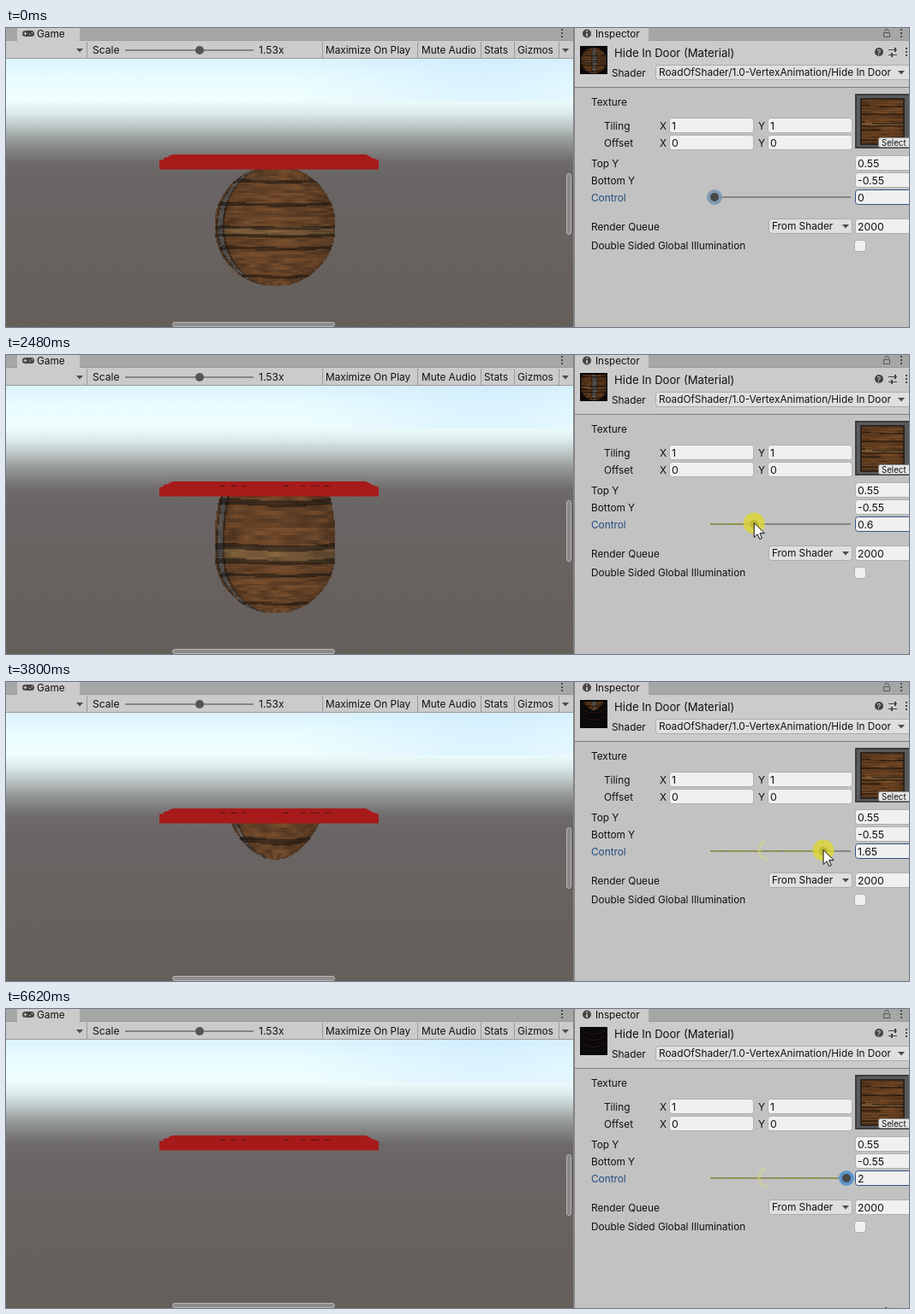
Write an HTML page with a canvas that moves like this. It is 1054x350 px and loops after 6.77 s.

```html
<!DOCTYPE html>
<html lang="en">
<head>
<meta charset="utf-8">
<title>Hide In Door</title>
<style>
  html, body { margin: 0; width: 100%; height: 100%; overflow: hidden; background: #c2c2c2; }
  canvas { display: block; }
</style>
</head>
<body>
<canvas id="stage" width="1054" height="350"></canvas>
<script>
const ctx = document.getElementById('stage').getContext('2d');
const LOOP = 6770, STEP = 78.3;
const INK = '#101010';

const CONTROL = [[16, 0], [17, 0.01], [22, 0.13], [25, 0.27], [30, 0.6], [39, 1.2], [47, 1.65], [53, 1.87], [60, 2]];
const ENTER = [[0, 1010, 335], [8, 842, 215], [11, 825, 196]];
const LEAVE = [[68, 984, 210], [73, 1010, 340]];

function sample(keys, k) {
  if (k <= keys[0][0]) return keys[0].slice(1);
  for (let i = 1; i < keys.length; i++) {
    const [a, b] = [keys[i - 1], keys[i]];
    if (k <= b[0]) {
      const f = (k - a[0]) / (b[0] - a[0]);
      return a.slice(1).map((v, j) => v + (b[j + 1] - v) * f);
    }
  }
  return keys[keys.length - 1].slice(1);
}

function box(x, y, w, h, fill, stroke, radius = 0) {
  ctx.beginPath();
  ctx.roundRect(x, y, w, h, radius);
  if (fill) { ctx.fillStyle = fill; ctx.fill(); }
  if (stroke) { ctx.strokeStyle = stroke; ctx.lineWidth = 1; ctx.stroke(); }
}

function dot(x, y, r, fill) {
  ctx.beginPath();
  ctx.arc(x, y, r, 0, 7);
  ctx.fillStyle = fill;
  ctx.fill();
}

function shape(points, fill) {
  ctx.beginPath();
  points.forEach(([x, y]) => ctx.lineTo(x, y));
  ctx.closePath();
  ctx.fillStyle = fill;
  ctx.fill();
}

function label(text, x, y, size = 11.8, color = INK) {
  ctx.font = `${size}px Inter, sans-serif`;
  ctx.fillStyle = color;
  ctx.fillText(text, x, y);
}

const arrowDown = (x, y) => shape([[x - 4, y - 2], [x + 4, y - 2], [x, y + 2.5]], '#4c4c4c');
const dots = (x, y) => [-4, 0, 4].forEach(d => box(x - 1, y + d - 1, 2, 2, '#4a4a4a'));

function field(text, x, y, w, stroke = '#b0b0b0') {
  box(x + .5, y + .5, w - 1, 17, '#f0f0f0', stroke, 3);
  label(text, x + 3, y + 14, 12.3);
}

function dropdown(text, x, y, w, arrowX) {
  box(x + .5, y + .5, w - 1, 17, '#dfdfdf', '#acacac', 3);
  label(text, x + 4, y + 13);
  arrowDown(arrowX, y + 9);
}

// Wood: horizontal planks with dark seams, one pale band and streaky grain.
const SEAMS = [.37, .18, -.015, -.08, -.185, -.42];
const hash = (a, b) => {
  const s = Math.sin(a * 127.1 + b * 311.7) * 43758.5;
  return s - Math.floor(s);
};

function grain(u, row) {
  const i = Math.floor(u), f = u - i;
  return hash(i, row) * (1 - f) + hash(i + 1, row) * f;
}

function wood(u, y, hoop, hoopWidth) {
  const noise = grain(u * 4 + 20, Math.floor(y * 55));
  const wave = .006 * Math.sin(u * 2.5 + 1);
  let light = .74 + .46 * noise;
  let rgb = y < -.015 && y > -.08 ? [130, 94, 55] : [108, 67, 34];
  if (SEAMS.some(s => Math.abs(y + wave - s) < .013)) light *= .5;
  const d = Math.abs(u - hoop);
  if (d < hoopWidth) rgb = [98, 92, 86];
  else if (d < hoopWidth + .06) light *= .5;
  light *= .72 + .28 * Math.cos(u);
  return `rgb(${rgb.map(c => c * light | 0)})`;
}

// Vertices near the door top are pulled upwards first, then the rest follows.
function ball(control, cx, cy, unit, cell, top, bottom, hoop, hoopWidth) {
  const shift = control - .525;
  for (let py = top; py < bottom; py += cell) {
    const seen = (cy - py) / unit;
    const y = seen / 1.1 + shift > 0 ? (seen - shift) / (1 + 1 / 1.1) : seen;
    if (Math.abs(y) >= .5) continue;
    const half = Math.sqrt(.25 - y * y) * unit;
    const cells = Math.floor(half / cell);
    for (let i = -cells; i <= cells; i++) {
      ctx.fillStyle = wood(Math.asin(i * cell / half), y, hoop, hoopWidth);
      ctx.fillRect(cx + i * cell - cell / 2, py, cell + .1, Math.min(cell, bottom - py) + .1);
    }
  }
}

function gameView(control) {
  const sky = ctx.createLinearGradient(0, 36, 0, 350);
  [[36, '#dcf3fd'], [58, '#e8fcff'], [84, '#effefe'], [100, '#dbe9e9'], [115, '#bcc6c6'], [130, '#9a9e9e'],
    [145, '#807f7f'], [158, '#6e6a6a'], [178, '#6a6565'], [350, '#655f5a']]
    .forEach(([y, c]) => sky.addColorStop((y - 36) / 314, c));
  box(0, 36, 662, 314, sky);
  const blue = ctx.createRadialGradient(560, 30, 0, 560, 30, 220);
  blue.addColorStop(0, 'rgba(200,230,255,.5)');
  blue.addColorStop(1, 'rgba(200,230,255,0)');
  ctx.save();
  ctx.beginPath();
  ctx.rect(0, 36, 662, 50);
  ctx.clip();
  box(0, 36, 662, 50, blue);
  ctx.restore();

  ball(control, 314, 231, 141, 1.5, 160, 301.5, -1.15, .1);
  shape([[179, 165.5], [179, 155], [184, 154], [184, 152], [190, 151], [190, 149.5], [196, 148],
    [420, 148], [424, 150], [427, 152], [433, 154], [435, 155], [435, 165.5]], '#a71a1a');
  if (control > .4) {
    [[250, 5], [262, 8], [276, 5], [323, 7], [345, 4], [356, 9], [372, 6]]
      .forEach(([x, w]) => box(x, 152.5, w, 1.5, '#6a1712'));
  }
  box(654.5, 170.5, 5, 71, '#8a8785', '#b9b7b5', 3);
  box(194.5, 344.5, 189, 5, '#8e8c8a', '#b9b7b5', 3);
}

function gameToolbar() {
  box(0, 0, 662, 15, '#a5a7a6');
  box(13, 0, 73, 15, '#cbcbcb');
  box(0, 14, 662, 22, '#cbcbcb');
  box(0, 14, 13, 1, '#999');
  box(86, 14, 576, 1, '#999');
  box(0, 35, 662, 1, '#999');
  box(19, 3, 14, 7, '#444', null, 3.5);
  box(22, 4.5, 1, 4, '#ccc'); box(20.5, 6, 4, 1, '#ccc');
  dot(28, 7.5, .8, '#ccc'); dot(30.5, 5.5, .8, '#ccc');
  label('Game', 36, 11);
  dots(649, 6);
  arrowDown(86, 26);
  [94, 369, 480, 554, 593, 645].forEach(x => box(x, 16, 1, 19, '#9b9b9b'));
  label('Scale', 101, 30, 12.1);
  box(139, 25, 150, 2, '#858585');
  dot(226, 26, 5, '#555');
  label('1.53x', 295, 30, 12.1);
  label('Maximize On Play', 373, 30);
  label('Mute Audio', 485, 30);
  label('Stats', 558, 30);
  label('Gizmos', 597, 30);
  arrowDown(653, 26);
}

function inspector(control) {
  box(662, 0, 2, 350, '#848484');
  box(664, 0, 390, 15, '#a5a7a6');
  box(664, 0, 86, 15, '#cbcbcb');
  box(664, 14, 390, 55, '#cbcbcb');
  box(750, 14, 304, 1, '#999');
  box(664, 69, 390, 281, '#c2c2c2');
  box(664, 69, 390, 1, '#7d7d7d');
  dot(678, 6.5, 5, '#444');
  box(677.3, 6, 1.5, 4, '#ddd'); box(677.3, 3, 1.5, 1.5, '#ddd');
  label('Inspector', 688, 11, 11.6);
  box(1024.5, 5.5, 7, 5, null, '#555');
  ctx.beginPath(); ctx.arc(1028, 4, 2.5, Math.PI, 0); ctx.stroke();
  dots(1045, 6);

  box(670, 21, 32, 33, '#0b0909');
  if (control > 1) {
    ctx.strokeStyle = '#2a1815';
    ctx.lineWidth = 1;
    [27, 34, 42].forEach(y => {
      ctx.beginPath(); ctx.moveTo(673, y - 2); ctx.quadraticCurveTo(686, y + 7, 699, y - 2); ctx.stroke();
    });
  }
  ball(control, 686, 37.5, 30, 1, 23, 53, .05, .17);
  label('Hide In Door (Material)', 710, 34, 13.1);
  dot(1019, 28, 5, '#444');
  label('?', 1016.5, 31.5, 9, '#eee');
  [[25, 1037], [31, 1033]].forEach(([y, x]) => { box(1030, y, 10, 1, '#444'); box(x, y - 2, 2, 5, '#444'); });
  dots(1051, 28);
  label('Shader', 707, 57);
  dropdown('RoadOfShader/1.0-VertexAnimation/Hide In Door', 758, 43, 300, 1045);

  label('Texture', 683, 91);
  [['Tiling', 105, '1'], ['Offset', 125, '0']].forEach(([name, y, value]) => {
    label(name, 698, y + 14);
    label('X', 763, y + 14); field(value, 774, y, 99);
    label('Y', 878, y + 14); field(value, 889, y, 99);
  });
  box(991, 77, 63, 64, '#3e3e40');
  box(993, 79, 61, 60, '#595b5f');
  box(997, 82, 52, 55, '#2d241d');
  for (let y = 84; y < 135; y += 1.5)
    for (let x = 999; x < 1047; x += 2) {
      ctx.fillStyle = wood((x - 1023) / 40, .5 - (y - 84) / 51);
      ctx.fillRect(x, y, 2, 1.5);
    }
  box(1018.5, 128.5, 40, 11, '#e6e6e6', '#8a8a8a', 2);
  label('Select', 1022, 138, 9.7);

  label('Top Y', 683, 163); field('0.55', 991, 149, 70);
  label('Bottom Y', 683, 183); field('-0.55', 991, 169, 70);
  label('Control', 683, 203, 11.8, '#204a80');
  field(String(+control.toFixed(2)), 991, 189, 70, '#34568a');
  label('Render Queue', 683, 237);
  dropdown('From Shader', 890, 223, 98, 980);
  field('2000', 991, 223, 70);
  label('Double Sided Global Illumination', 683, 259);
  box(990.5, 248.5, 13, 13, '#f0f0f0', '#b0b0b0', 3);
}

function slider(control, x, k) {
  box(822, 197, 164, 2, '#858585');
  if (control > .2) {
    ctx.strokeStyle = '#92963f';
    ctx.lineWidth = 1.5;
    ctx.setLineDash([4, 2, 10, 3, 26, 2, 16, 3]);
    ctx.beginPath(); ctx.moveTo(822, 198); ctx.lineTo(x, 198); ctx.stroke();
    ctx.setLineDash([]);
  }
  if (control > .85) {
    ctx.strokeStyle = 'rgba(214,214,140,.45)';
    ctx.lineWidth = 4;
    ctx.beginPath(); ctx.arc(890, 197, 11, 1.7, 4.4); ctx.stroke();
  }
  const pressed = k >= 15 && k < 68;
  if (!pressed) dot(x, 198, 9, k < 15 ? '#7f9ab3' : '#5c96cc');
  dot(x, 198, 5, '#474747');
}

function cursor(x, y, pressed) {
  if (pressed) dot(x, y + .5, 12.5, 'rgba(222,214,48,.8)');
  ctx.save();
  ctx.translate(x, y);
  shape([[0, 0], [0, 17], [4, 13.3], [6.6, 19], [9.2, 18], [6.7, 12.2], [12, 12]], '#fff');
  ctx.strokeStyle = '#111';
  ctx.lineWidth = 1;
  ctx.stroke();
  ctx.restore();
}

function draw(k) {
  const [control] = sample(CONTROL, k);
  const handleX = 827 + 77 * control;
  gameView(control);
  gameToolbar();
  inspector(control);
  slider(control, handleX, k);
  if (k >= 0 && k < 17) cursor(...sample(ENTER, k), k >= 15);
  else if (k >= 17 && k < 68) cursor(handleX + (k > 61 ? 1 : 0), k > 61 ? 198 : 196.5, true);
  else if (k >= 68 && k < 74) cursor(...sample(LEAVE, k), false);
  else if (k >= 83) cursor(1027, 349, false);
}

let shown;
function tick() {
  const t = performance.now() % LOOP;
  const k = t < 130 ? -1 : Math.floor((t - 110) / STEP);
  if (k !== shown) draw(shown = k);
  requestAnimationFrame(tick);
}
tick();
</script>
</body>
</html>
```
